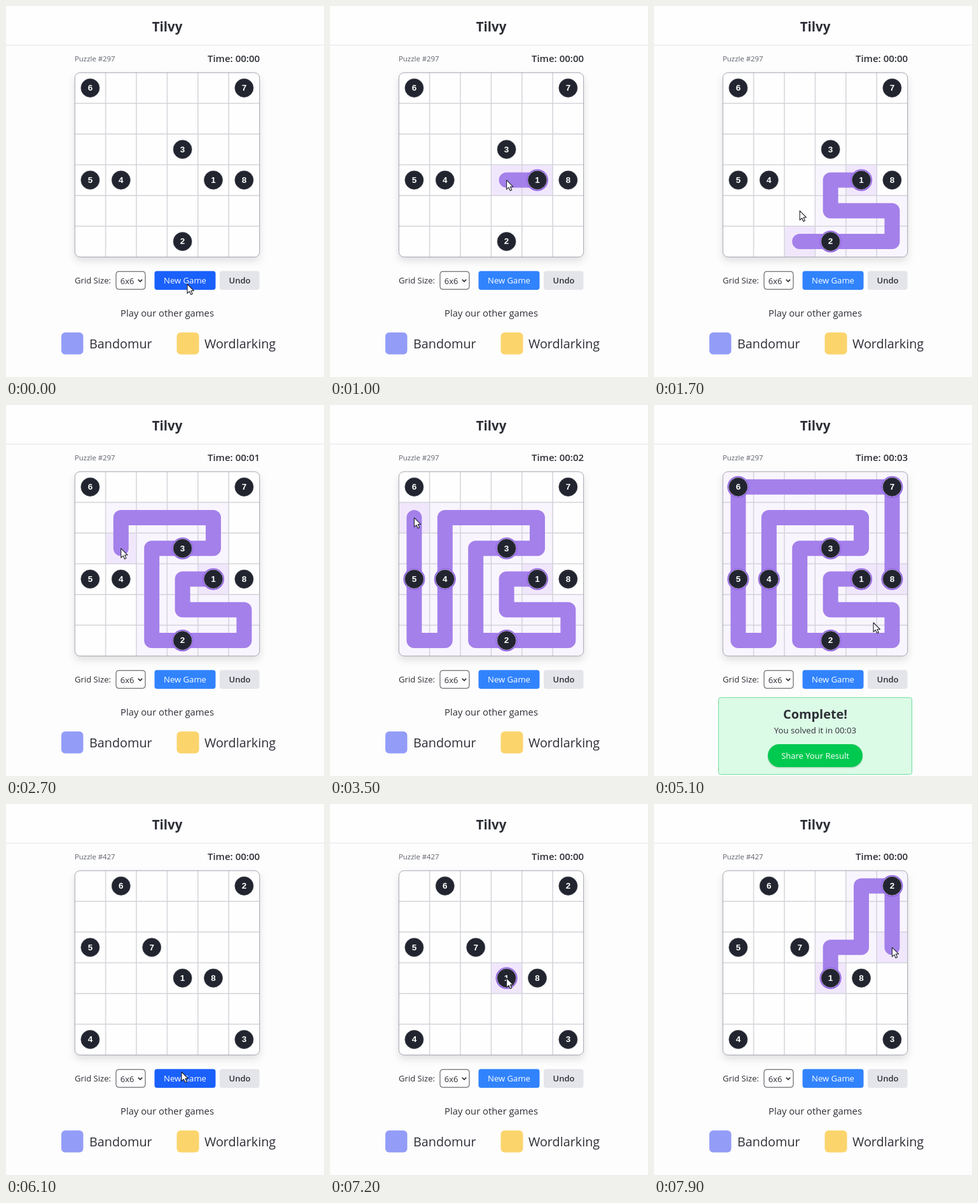
Recreate the animation shown at these times as an HTML page. Size 500 px wide and 583 px high, loop 8 s.

```html
<!DOCTYPE html>
<html lang="en">
<head>
<meta charset="utf-8">
<title>Path puzzle</title>
<style>
  html, body { margin: 0; width: 100%; height: 100%; overflow: hidden; background: #fdfdfd; }
  svg { display: block; width: 500px; height: 583px; }
  text { font-family: "Open Sans", "Noto Sans", sans-serif; fill: #2d2f36; }
  .mid { text-anchor: middle; }
  .semi { font-weight: 600; }
  .bold { font-weight: 700; }
  .light { fill: #fff; }
  .num { font: bold 13.5px "Liberation Sans", Arial, sans-serif; fill: #fff; text-anchor: middle; }
  .board { fill: #fefefe; filter: drop-shadow(0 6px 6px rgba(20, 20, 40, .13)); }
  .frame { fill: none; stroke: #a3a5ae; }
  .lines { stroke: #d3d4da; stroke-width: 1.5; }
  .trail { fill: none; stroke: #a480ea; stroke-width: 24; stroke-linecap: round; stroke-linejoin: round; }
  .disc { fill: #22252f; stroke: #4a4d58; stroke-width: .6; }
  .ring { fill: #d9c8f8; stroke: #9668e6; stroke-width: 1.8; }
  .share { fill: #00c950; filter: drop-shadow(0 1px 1px rgba(0, 0, 0, .2)); }
</style>
</head>
<body>
<svg viewBox="0 0 500 583">
  <rect width="500" height="61" fill="#fefefe"/>
  <path d="M0 61.5H500" stroke="#e4e5e9"/>
  <text class="mid bold" x="253.5" y="39.5" font-size="20.5">Tilvy</text>
  <text id="title" x="108" y="87" font-size="11.4" style="fill:#5d616b"></text>
  <text id="timer" class="semi" x="399" y="87.5" font-size="15" text-anchor="end"></text>

  <clipPath id="round"><rect x="108" y="104.5" width="291" height="290" rx="8"/></clipPath>
  <rect class="board" x="108" y="104.5" width="291" height="290" rx="8"/>
  <g clip-path="url(#round)">
    <g id="cells"></g>
    <path id="lines" class="lines"/>
  </g>
  <rect class="frame" x="108.3" y="104.8" width="290.4" height="289.6" rx="8"/>
  <path id="trail" class="trail"/>
  <g id="marks"></g>

  <text x="108" y="436.3" font-size="13.1">Grid Size:</text>
  <rect x="173" y="417.2" width="46" height="28" rx="4" fill="#fefefe" stroke="#45474f"/>
  <text x="179.8" y="436.6" font-size="13">6x6</text>
  <path d="M207.8 429.8l3.2 3.2 3.2-3.2" fill="none" stroke="#2d2f36" stroke-width="1.7"/>
  <rect id="start" x="233.5" y="416.5" width="96" height="29.5" rx="4"/>
  <text class="mid light" x="281.5" y="436.3" font-size="13.1">New Game</text>
  <rect x="336" y="416.5" width="62.5" height="29.5" rx="4" fill="#e4e5ea"/>
  <text class="mid semi" x="367.5" y="436.3" font-size="13">Undo</text>

  <g id="games">
    <text class="mid" x="253.5" y="487.7" font-size="14.8">Play our other games</text>
    <rect x="87" y="513" width="34.5" height="34.5" rx="6" fill="#939df8"/>
    <text x="131" y="538" font-size="19.8">Bandomur</text>
    <rect x="268.5" y="513" width="35" height="34.5" rx="6" fill="#fbd46c"/>
    <text x="312" y="538" font-size="19.8">Wordlarking</text>
  </g>
  <g id="done">
    <rect x="101.5" y="459.8" width="304" height="120.7" rx="3" fill="#dcfbe7" stroke="#72dd9c"/>
    <text class="mid bold" x="253.5" y="493" font-size="19.9">Complete!</text>
    <text class="mid" x="253.5" y="516" font-size="13.2">You solved it in 00:03</text>
    <rect class="share" x="179" y="533" width="149" height="36" rx="18"/>
    <text class="mid light" x="253.5" y="556" font-size="13">Share Your Result</text>
  </g>
  <path id="cursor" d="M0 0V14.6L3.4 11.5 5.7 16.6 8.2 15.5 5.9 10.5H10.4Z" fill="#fff" stroke="#20222a" stroke-width="1.1" stroke-linejoin="round"/>
</svg>
<script>
const LOOP = 8000, STEP = 100, SIZE = 6;
const RESET = 5800;
const STEPS = { L: [-1, 0], R: [1, 0], U: [0, -1], D: [0, 1] };
const $ = id => document.getElementById(id);
const px = c => 132.4 + 48.4 * c;
const py = r => 128.8 + 48.25 * r;

// marks: column and row of each number; moves start from the first number
const puzzles = [
  { id: 297, marks: "43 35 32 13 03 00 50 53", moves: "LDRRDLLLUUURRULLLDDDDLUUUUURRRRRDDD", press: 800 },
  { id: 427, marks: "33 50 55 05 02 10 22 43", moves: "URUURDD", press: 7100 }
];
for (const p of puzzles) {
  p.marks = p.marks.split(" ").map(s => [+s[0], +s[1]]);
  p.route = [p.marks[0]];
  for (const m of p.moves) {
    const [c, r] = p.route[p.route.length - 1];
    p.route.push([c + STEPS[m][0], r + STEPS[m][1]]);
  }
  p.go = p.press + STEP;
  p.end = p.go + p.moves.length * STEP;
}
const [first, second] = puzzles;

// cursor travel between the drawing runs: time, x, y
const travel = [
  [0, 285, 437], [150, 285, 436], [700, px(4), py(3)], [first.go, px(4), py(3)],
  [first.end, px(5), py(3)], [4700, 371, 292], [5100, 345, 342], [5650, 281, 429],
  [5900, 280, 429], [6100, 276, 421], [6900, px(3), py(3)], [LOOP, px(3), py(3)]
];

function make(parent, tag, attrs, text = "") {
  const el = document.createElementNS("http://www.w3.org/2000/svg", tag);
  for (const k in attrs) el.setAttribute(k, attrs[k]);
  el.textContent = text;
  return parent.appendChild(el);
}

let grid = "";
for (let i = 1; i < SIZE; i++) {
  grid += `M${px(i - .5)} 104V395M108 ${py(i - .5)}H399`;
}
$("lines").setAttribute("d", grid);

const cells = [];
for (let i = 0; i < SIZE * SIZE; i++) {
  cells.push(make($("cells"), "rect", {
    x: px(i % SIZE - .5), y: py(Math.floor(i / SIZE) - .5), width: 48.4, height: 48.3
  }));
}
const marks = first.marks.map((_, i) => {
  const g = make($("marks"), "g", {});
  const ring = make(g, "circle", { class: "ring", r: 16.2 });
  make(g, "circle", { class: "disc", r: 14.6 });
  make(g, "text", { class: "num", y: 4.3 }, i + 1);
  return { g, ring };
});

function along(route, at) {
  const i = Math.min(Math.floor(at), route.length - 1);
  const a = route[i], b = route[Math.min(i + 1, route.length - 1)], f = at - i;
  return [px(a[0] + (b[0] - a[0]) * f), py(a[1] + (b[1] - a[1]) * f)];
}

function pointer(t) {
  for (const p of puzzles) {
    if (t < p.go || t > p.end) continue;
    // the hand runs a little ahead of the trail on the first long turn
    const lead = p === first ? Math.max(0, 1 - Math.abs(t - 1700) / 400) : 0;
    return along(p.route, (t - p.go) / STEP + lead);
  }
  const i = travel.findIndex(k => k[0] > t);
  const a = travel[i - 1], b = travel[i];
  const u = (t - a[0]) / (b[0] - a[0]), e = u * u * (3 - 2 * u);
  return [a[1] + (b[1] - a[1]) * e, a[2] + (b[2] - a[2]) * e];
}

function draw(t) {
  const p = t < RESET ? first : second;
  const pressed = t >= p.press;
  const head = Math.min(Math.max(0, Math.floor((t - p.go) / STEP)), p.moves.length);
  const path = pressed ? p.route.slice(0, head + 1) : [];
  const order = (c, r) => path.findIndex(q => q[0] === c && q[1] === r);

  cells.forEach((cell, i) => {
    const n = order(i % SIZE, Math.floor(i / SIZE));
    cell.setAttribute("fill", n < 0 ? "none" : n === 0 || n === head ? "#f1e7fd" : "#f9f5fe");
  });
  marks.forEach(({ g, ring }, i) => {
    const [c, r] = p.marks[i];
    g.setAttribute("transform", `translate(${px(c)} ${py(r)})`);
    ring.style.display = order(c, r) < 0 ? "none" : "";
  });
  $("trail").setAttribute("d", path.length > 1 ? "M" + path.map(([c, r]) => `${px(c)} ${py(r)}`).join("L") : "");

  const secs = pressed ? Math.floor((Math.min(t, p.end) - p.press) / 1000) : 0;
  $("title").textContent = "Puzzle #" + p.id;
  $("timer").textContent = "Time: 00:0" + secs;

  const solved = p === first && t >= p.end;
  $("done").style.display = solved ? "" : "none";
  $("games").style.display = solved ? "none" : "";

  const [x, y] = pointer(t);
  const hover = x > 233 && x < 330 && y > 416 && y < 446;
  $("start").setAttribute("fill", hover ? "#1a60fb" : "#3183fd");
  $("cursor").setAttribute("transform", `translate(${x} ${y})`);
}

const began = performance.now();
function tick() {
  const t = (performance.now() - began) % LOOP;
  draw(Math.floor((t + 5) / STEP) * STEP % LOOP);
  requestAnimationFrame(tick);
}
tick();
</script>
</body>
</html>
```
